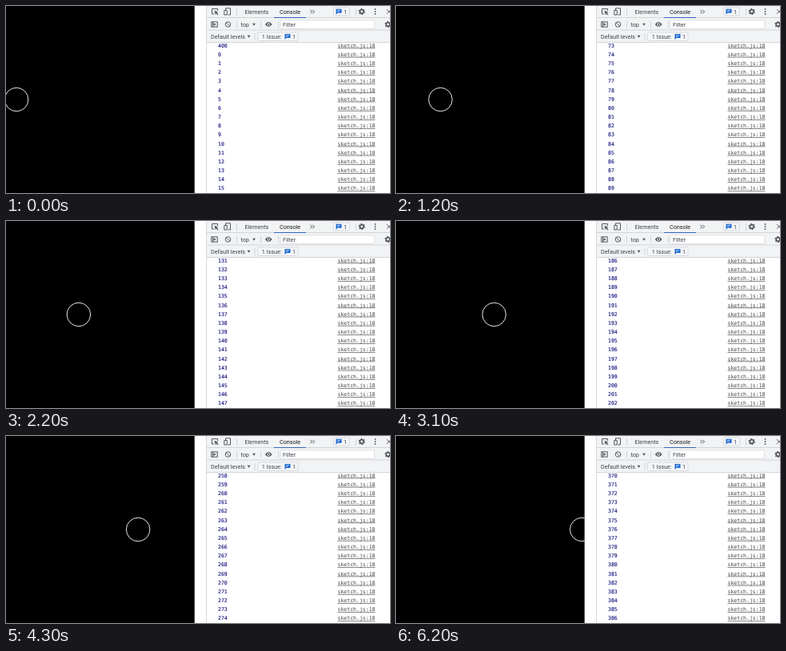
An HTML page for the animation above (6.3 s loop, 480x234 px).

```html
<!DOCTYPE html>
<html lang="en">
<head>
<meta charset="utf-8">
<title>Moving circle with console</title>
<style>
  html, body { margin: 0; width: 100%; height: 100%; overflow: hidden; background: #fff; }
  svg { display: block; }
  text { font: 7.2px Roboto, sans-serif; fill: #3f4247; }
  .dark { fill: #17181a; }
  .log text { font: 6.5px "DejaVu Sans Mono", monospace; fill: #12127e; stroke: #12127e; stroke-width: .12; }
  .log .link { fill: #404145; stroke: none; text-decoration: underline; }
  .icon { fill: none; stroke: #54575c; stroke-width: 1; }
  .solid { fill: #54575c; }
  .rule { stroke: #cbcdd1; stroke-width: .8; }
  .box { fill: #fff; stroke: #d3d5d9; stroke-width: .7; }
  .badge { fill: #f4f6f8; stroke: #cdd0d5; stroke-width: .7; }
</style>
</head>
<body>
<svg width="480" height="234" viewBox="0 0 480 234">
  <defs>
    <g id="gear" class="icon">
      <circle r="2.3" stroke-width="1.7"/>
      <circle r="3.5" stroke-width="1.2" stroke-dasharray="1.9 1.765"/>
    </g>
    <g id="bubble">
      <path d="M-3.5-3h7v5h-5l-2 2z" fill="#1a66d0"/>
      <path d="M-2-1.4h4M-2 .3h2.6" stroke="#fff" stroke-width=".7"/>
    </g>
    <path id="arrow" class="solid" d="M-2-1.4h4l-2 3z"/>
    <clipPath id="logArea"><rect x="251" y="46" width="229" height="188"/></clipPath>
    <clipPath id="sketchArea"><rect width="235.7" height="234"/></clipPath>
  </defs>

  <rect width="235.7" height="234"/>
  <g clip-path="url(#sketchArea)">
    <circle id="ball" cy="117" r="14.75" fill="none" stroke="#fff" stroke-width=".9"/>
  </g>

  <rect x="250.5" width="229.5" height="46" fill="#f1f3f4"/>
  <path class="rule" d="M250.5 0V234M250.5 14.5H480M250.5 30H480M250.5 45.5H480M288.5 3v9M437.5 3v9M288.5 18.5v9M318.5 18.5v9M340.5 18.5v9M311 34v9"/>

  <!-- Tab bar -->
  <path class="icon" d="M260 10h-2.5V3.5h7V6"/>
  <path class="solid" d="M260.5 5.8l5 2-2 .8 2 2-.8.8-2-2-.9 1.8z"/>
  <path class="icon" d="M274.5 5V2.8h6V11h-3M272.800 5.5h3.5V11h-3.5z"/>
  <text x="298.500" y="9.600">Elements</text>
  <text x="342" y="9.600" class="dark">Console</text>
  <rect x="335" y="14" width="40" height="1" fill="#3567c0"/>
  <path class="icon" d="M380.300 4.800l2.300 2.300-2.300 2.300M383.300 4.800l2.300 2.300-2.300 2.300"/>
  <rect class="badge" x="409.500" y="2" width="20" height="10" rx="1"/>
  <use href="#bubble" x="416" y="6.700"/>
  <text x="422" y="9.500">1</text>
  <use href="#gear" x="444.700" y="7"/>
  <g class="solid"><circle cx="461.500" cy="4" r=".9"/><circle cx="461.500" cy="7" r=".9"/><circle cx="461.500" cy="10" r=".9"/></g>
  <path class="icon" d="M476 4.200l5.600 5.600M476 9.800l5.600-5.600"/>

  <!-- Console toolbar -->
  <rect class="icon" x="256.800" y="19.800" width="7.400" height="6.400"/>
  <path class="solid" d="M259.600 21l3 2-3 2z"/>
  <path class="icon" d="M258.600 20v6"/>
  <circle class="icon" cx="277.500" cy="23" r="3.300"/>
  <path class="icon" d="M275.200 20.700l4.600 4.600"/>
  <text x="293.400" y="25.500">top</text>
  <use href="#arrow" x="310" y="23.200"/>
  <path class="solid" d="M323.800 23q4.400-6 8.800 0q-4.400 6-8.800 0"/>
  <circle cx="328.200" cy="23" r="1.500" fill="#54575c" stroke="#f1f3f4" stroke-width=".9"/>
  <rect class="box" x="343" y="17.800" width="117.500" height="10.600" rx="1"/>
  <text x="346" y="25.600">Filter</text>
  <use href="#gear" x="477.500" y="23"/>

  <!-- Levels bar -->
  <text x="256" y="40.600">Default levels</text>
  <use href="#arrow" x="303.500" y="38.200"/>
  <rect class="badge" x="314.500" y="33" width="50.500" height="10.500" rx="1"/>
  <text x="319.800" y="40.600">1 Issue:</text>
  <use href="#bubble" x="352" y="38"/>
  <text x="358" y="40.600">1</text>

  <g id="log" class="log" clip-path="url(#logArea)"></g>
</svg>
<script>
  const STEP = 100, STEPS = 63, ROWS = 17, COUNT = 401;
  // The log trails the ball unevenly: [step, last logged value]
  const PACE = [[0, 15], [12, 89], [22, 147], [31, 202], [43, 274], [52, 329], [62, 386]];

  const ball = document.getElementById('ball');
  const log = document.getElementById('log');

  function addText(x, y, content, className) {
    const el = document.createElementNS('http://www.w3.org/2000/svg', 'text');
    el.setAttribute('x', x);
    el.setAttribute('y', y);
    el.setAttribute('class', className);
    el.textContent = content;
    return log.appendChild(el);
  }

  const numbers = Array.from({ length: ROWS }, (_, i) => {
    const y = 51.6 + i * 11.18;
    addText(414.5, y, 'sketch.js:18', 'link');
    return addText(265, y, '', 'number');
  });

  function lastLogged(step) {
    const i = Math.max(1, PACE.findIndex(([s]) => s >= step));
    const [s0, v0] = PACE[i - 1], [s1, v1] = PACE[i];
    return Math.round(v0 + (v1 - v0) * (step - s0) / (s1 - s0));
  }

  function draw() {
    const step = Math.floor(performance.now() / STEP) % STEPS;
    const last = lastLogged(step);
    ball.setAttribute('cx', 13.1 + 3.535 * step);
    numbers.forEach((el, i) => {
      el.textContent = (last - ROWS + 1 + i + COUNT) % COUNT;
    });
    requestAnimationFrame(draw);
  }
  draw();
</script>
</body>
</html>
```
